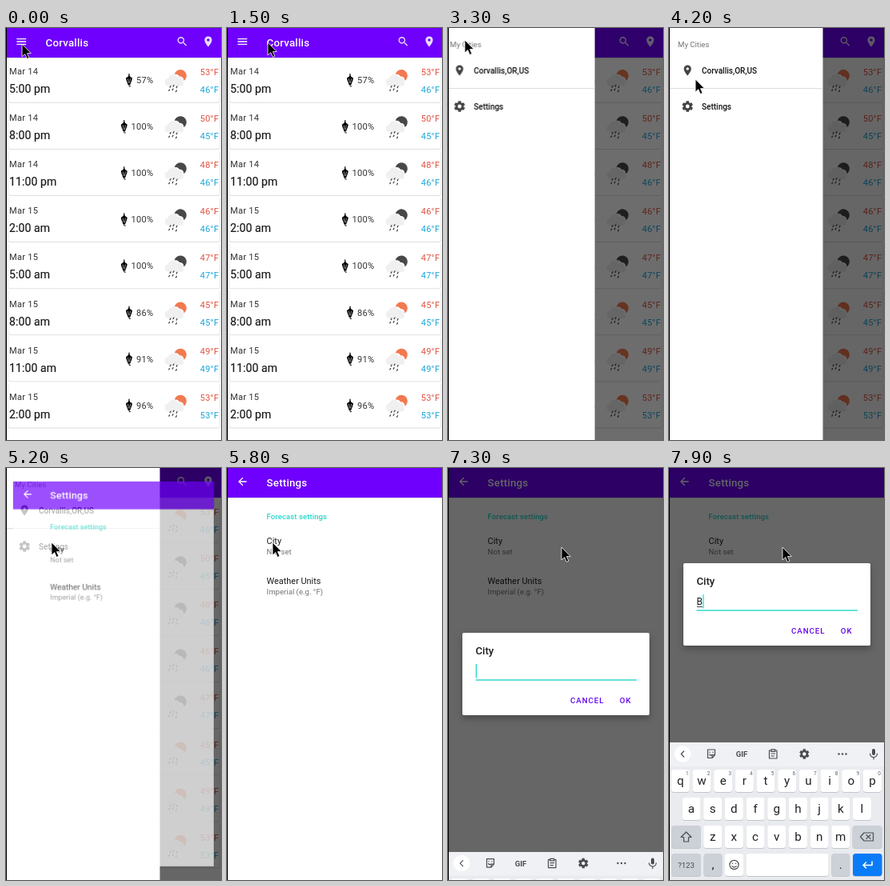
An HTML page for the animation above (8 s loop, 269 by 515 pixels).

```html
<!DOCTYPE html>
<html lang="en">
<head>
<meta charset="utf-8">
<title>Weather app</title>
<style>
html, body { margin: 0; width: 100%; height: 100%; overflow: hidden; background: #fff; }
svg { display: block; width: 100vw; height: 100vh; font-family: Roboto, Arial, sans-serif; }
.anim { animation: 8s linear infinite; }
.med { font-weight: 500; }
.title { font-size: 13.3px; font-weight: 500; letter-spacing: .2px; fill: #fff; }
.small { font-size: 11.1px; letter-spacing: .25px; fill: #333; }
.time { font-size: 14px; letter-spacing: .1px; fill: #1c1c1c; stroke: #1c1c1c; stroke-width: .2px; }
.hi { fill: #e2523f; }
.lo { fill: #1ba6dc; }
.end { text-anchor: end; }
.mid { text-anchor: middle; }
.item { font-size: 10px; font-weight: 500; fill: #111; }
.pref { font-size: 10.9px; fill: #1c1c1c; }
.sum { font-size: 9.6px; fill: #757575; }
.btn { font-size: 9.7px; font-weight: 500; letter-spacing: .95px; fill: #6200ee; }
.key { font-size: 15.2px; fill: #202124; }
.hint { font-size: 6.5px; fill: #5f6368; }

#pointer { animation-name: pointer; }
#drawer { animation-name: drawer; }
#scrim { animation-name: scrim; }
#settings { animation-name: settings; transform-origin: 135px 257px; }
#ripple { animation-name: ripple; }
#dim { animation-name: dim; }
#dialog { animation-name: dialog; }
#keyboard { animation-name: keyboard; }
#typed { animation-name: typed; }
#caret { animation-name: caret; }

@keyframes pointer {
  0% { transform: translate(20px, 20px); }
  6.25% { transform: translate(25px, 19px); }
  17.5% { transform: translate(46px, 18px); }
  18.75% { transform: translate(51px, 18px); }
  28.75% { transform: translate(47px, 18px); }
  33.75%, 42.5% { transform: translate(21px, 15px); }
  51.25%, 52.5% { transform: translate(33px, 64px); }
  62.5%, 75.6% { transform: translate(57px, 93px); }
  81.25%, 100% { transform: translate(142px, 99px); }
}
@keyframes drawer {
  0%, 38.1% { transform: translateX(-194px); animation-timing-function: ease-out; }
  41.9%, 100% { transform: none; }
}
@keyframes scrim {
  0%, 38.1% { opacity: 0; animation-timing-function: ease-out; }
  41.9%, 100% { opacity: .6; }
}
@keyframes settings {
  0%, 64% { opacity: 0; transform: scale(.9); animation-timing-function: ease-out; }
  66% { opacity: 1; }
  68.5%, 100% { opacity: 1; transform: none; }
}
@keyframes ripple {
  0%, 76% { opacity: 0; transform: scale(.1); }
  76.5% { opacity: .12; }
  81.25% { opacity: .12; transform: scale(1); }
  84% { opacity: .12; }
  87.5%, 100% { opacity: 0; transform: scale(1); }
}
@keyframes dim {
  0%, 82.5% { opacity: 0; }
  83.75% { opacity: .125; }
  85% { opacity: .36; }
  86.25% { opacity: .54; }
  87.5%, 100% { opacity: .6; }
}
@keyframes dialog {
  0%, 82.5% { opacity: 0; transform: none; }
  83.75% { opacity: .5; }
  85% { opacity: 1; }
  91.5% { opacity: 1; transform: none; animation-timing-function: ease-out; }
  94.5%, 100% { opacity: 1; transform: translateY(-87px); }
}
@keyframes keyboard {
  0%, 90.8% { transform: translateY(174px); animation-timing-function: ease-out; }
  94.2%, 100% { transform: none; }
}
@keyframes typed {
  0%, 97.49% { opacity: 0; }
  97.5%, 100% { opacity: 1; }
}
@keyframes caret {
  0%, 97.49% { transform: none; }
  97.5%, 100% { transform: translateX(7.6px); }
}
</style>
</head>
<body>
<svg id="stage" viewBox="0 0 269 515" preserveAspectRatio="none"></svg>
<script>
const PURPLE = '#6f00fd', TEAL = '#24d8cb';
const ICON = {
  menu: 'M3 18h18v-2H3v2zm0-5h18v-2H3v2zm0-7v2h18V6H3z',
  search: 'M15.5 14h-.79l-.28-.27C15.41 12.59 16 11.11 16 9.5 16 5.91 13.09 3 9.5 3S3 5.91 3 9.5 5.91 16 9.5 16c1.61 0 3.09-.59 4.23-1.57l.27.28v.79l5 4.99L20.49 19l-4.99-5zm-6 0C7.01 14 5 11.99 5 9.5S7.01 5 9.5 5 14 7.01 14 9.5 11.99 14 9.5 14z',
  pin: 'M12 2C8.13 2 5 5.13 5 9c0 5.25 7 13 7 13s7-7.75 7-13c0-3.87-3.13-7-7-7zm0 9.5c-1.38 0-2.5-1.12-2.5-2.5s1.12-2.5 2.5-2.5 2.5 1.12 2.5 2.5-1.12 2.5-2.5 2.5z',
  back: 'M20 11H7.83l5.59-5.59L12 4l-8 8 8 8 1.41-1.41L7.83 13H20v-2z'
};

const text = (x, y, s, cls) => `<text x="${x}" y="${y}" class="${cls}">${s}</text>`;
const rect = (x, y, w, h, fill, rx = 0) =>
  `<rect x="${x}" y="${y}" width="${w}" height="${h}" rx="${rx}" fill="${fill}"/>`;
const path = (d, fill, extra = '') => `<path d="${d}" fill="${fill}" ${extra}/>`;
const line = (d, color, w = 1.2) =>
  path(d, 'none', `stroke="${color}" stroke-width="${w}" stroke-linecap="round" stroke-linejoin="round"`);
const icon = (name, cx, cy, fill, k = .66) =>
  `<g transform="translate(${cx - 12 * k} ${cy - 12 * k}) scale(${k})">${path(ICON[name], fill)}</g>`;
const group = (id, body) => `<g id="${id}" class="anim">${body}</g>`;

function gear(cx, cy, r, fill) {
  let teeth = '';
  for (let a = 0; a < 180; a += 60)
    teeth += `<rect x="${-r * .27}" y="${-r}" width="${r * .54}" height="${2 * r}" rx=".5" transform="rotate(${a})" fill="${fill}"/>`;
  return `<g transform="translate(${cx} ${cy})">${teeth}
    <circle r="${r * .56}" fill="none" stroke="${fill}" stroke-width="${r * .42}"/>
    <circle r="${r * .35}" fill="#fff"/></g>`;
}

const umbrella = x => `<g transform="translate(${x} 0)">
  ${line('M0 57.5V60', '#000')}
  ${path('M0 59Q-1.2 61-4 62.6L-3.4 65.4L-1.3 71H1.3L3.4 65.4L4 62.6Q1.2 61 0 59Z', '#000')}
  ${line('M-1.5 63.6L-.7 68.5M1.5 63.6L.7 68.5', '#fff', .6)}
  ${line('M0 71V72.6Q.4 73.6 1.6 72.8', '#000', 1)}</g>`;

const weather = sun =>
  path('M210.8 58A7.6 7.6 0 1 1 222.4 66C222.6 62.4 220 60.6 217 60.6C215.8 58.2 213.4 57.2 210.8 58Z', sun) +
  path('M203 72.5A4.8 4.8 0 0 1 202.6 63A6.6 6.6 0 0 1 214.8 61.6A5.4 5.4 0 0 1 221.4 67A3.4 3.4 0 0 1 220 72.5Z', '#f0f0f0') +
  line('M206 72.5l-.8 1.6M210 71.5l-.8 1.6M214 73l-.8 1.6M204.6 77l-.8 1.4M209 76l-.8 1.6M213.4 78l-.8 1.6', '#444', 1.3);

// date, time, rain chance, high, low
const forecast = [
  ['Mar 14', '5:00 pm', 57, 53, 46], ['Mar 14', '8:00 pm', 100, 50, 45],
  ['Mar 14', '11:00 pm', 100, 48, 46], ['Mar 15', '2:00 am', 100, 46, 46],
  ['Mar 15', '5:00 am', 100, 47, 47], ['Mar 15', '8:00 am', 86, 45, 45],
  ['Mar 15', '11:00 am', 91, 49, 49], ['Mar 15', '2:00 pm', 96, 53, 53]
];
const row = ([day, time, rain, hi, lo], i) => `<g transform="translate(0 ${58.1 * i})">
  ${rect(3, 37, 264.5, 56.8, '#dedede', 2)}${rect(3.4, 36, 263.6, 56.8, '#fff', 2)}
  ${text(4, 58, day, 'small')}${text(4, 81, time, 'time')}
  ${umbrella(rain > 99 ? 147.8 : 154)}${text(184.3, 69, rain + '%', 'small end')}
  ${weather(i > 0 && i < 5 ? '#484848' : '#f27950')}
  ${text(266.4, 59, hi + '°F', 'small hi end')}${text(266.4, 81, lo + '°F', 'small lo end')}</g>`;

const bar = (title, left) =>
  rect(0, 37, 269, 1, '#e9e9e9') + rect(0, 0, 269, 37, PURPLE) +
  icon(left, 19.3, 17, '#fff') + text(49.6, 23, title, 'title');

const home = rect(0, 0, 269, 515, '#fff') + forecast.map(row).join('') +
  bar('Corvallis', 'menu') + icon('search', 220.5, 17, '#e9dcff') + icon('pin', 253, 17, '#e9dcff');

const drawer = rect(0, 0, 192.5, 515, '#fff') +
  text(11, 24, 'My Cities', 'sum') +
  icon('pin', 23.2, 53, '#444') + text(41, 57, 'Corvallis,OR,US', 'item') +
  rect(0, 75, 192.5, 1, '#dcdcdc') +
  gear(23.2, 98, 6.8, '#444') + text(41, 102, 'Settings', 'item');

const settings = rect(0, 0, 269, 515, '#fff') +
  `<text x="49.6" y="64" class="med" font-size="9.5" letter-spacing=".1" fill="${TEAL}">Forecast settings</text>
  <g clip-path="url(#cityRow)"><g transform="translate(57 97)"><circle id="ripple" class="anim" r="225"/></g></g>` +
  text(49.6, 95, 'City', 'pref') + text(49.6, 108, 'Not set', 'sum') +
  text(49.6, 145, 'Weather Units', 'pref') + text(49.6, 158, 'Imperial (e.g. °F)', 'sum') +
  bar('Settings', 'back');

const dialog = `<rect x="18" y="206" width="234" height="103" rx="2" fill="#fff" filter="url(#shadow)"/>` +
  `<text x="34.5" y="233" class="med" font-size="13.2" fill="#1c1c1c">City</text>` +
  rect(34.5, 264.3, 201.5, 1.4, TEAL) +
  group('typed', '<text x="34.4" y="258.3" font-size="12" fill="#1c1c1c">B</text>' + rect(35, 260, 7, .9, '#333')) +
  group('caret', rect(34.7, 245, 1.3, 17.5, TEAL)) +
  text(153, 293.5, 'CANCEL', 'btn') + text(214.8, 293.5, 'OK', 'btn');

const GREY = '#ccd0d7', INK = '#4a4d52';
const key = (x, y, w, fill = '#fff') =>
  rect(x, y + 1, w, 28, '#c3c6cb', 3.5) + rect(x, y, w, 28, fill, 3.5);
const letters = (s, x0, y, hints = '') => [...s].map((c, i) => {
  const cx = x0 + 26.68 * i;
  return key(cx - 11.5, y, 23) + text(cx, y + 19, c, 'key mid') +
    (hints ? text(cx + 10.4, y + 7, hints[i], 'hint end') : '');
}).join('');

const tools =
  '<circle cx="17" cy="357.5" r="10.3" fill="#fff"/>' + line('M18.6 354l-3.4 3.5l3.4 3.5', INK) +
  line('M48.5 352H57.5V358.5L54 362.5H48.5ZM54 362.5V358.5H57.5M50.6 358Q52 360 53.5 358.5M51 355v.4M55 355v.4', INK) +
  `<text x="91" y="361" class="mid" font-size="9.6" font-weight="700" fill="${INK}">GIF</text>` +
  line('M127.5 353H125.5V363H135V353H133M127.8 351.8H132.7V354.4H127.8ZM128 357H132.5M128 360H131.5', INK) +
  gear(169.3, 357.5, 6.2, INK) +
  [212.5, 217, 221.5].map(x => `<circle cx="${x}" cy="357.5" r="1.2" fill="${INK}"/>`).join('') +
  rect(254, 351, 4, 8, INK, 2) + line('M251.6 357.2A4.4 4.4 0 0 0 260.4 357.2M256 361.6V364', INK);

const keyboard = rect(0, 343, 269, 172, '#e9ebef') + rect(0, 343, 269, 30, '#eff1f4') + tools +
  letters('qwertyuiop', 14.3, 377, '1234567890') +
  letters('asdfghjkl', 28, 412) +
  key(3, 447, 37, GREY) + letters('zxcvbnm', 54.7, 447) + key(229.5, 447, 37, GREY) +
  line('M21.5 455L28 461.5H24.5V467H18.5V461.5H15Z', INK) +
  line('M239.5 461L244 456H255.5V466H244ZM247 458.7L252 463.3M252 458.7L247 463.3', INK) +
  key(3, 482, 37, GREY) + `<text x="21.5" y="499.5" class="mid" font-size="9.6" fill="${INK}">?123</text>` +
  key(43.5, 482, 23, GREY) + text(55, 501, ',', 'key mid') +
  key(70, 482, 23) + `<circle cx="81.5" cy="496" r="5.6" fill="none" stroke="${INK}" stroke-width="1.2"/>` +
  line('M79.5 494.2v.3M83.5 494.2v.3M78.8 497.6Q81.5 500.6 84.2 497.6', INK) +
  key(96.5, 482, 103) +
  key(203.3, 482, 23, GREY) + text(214.8, 501, '.', 'key mid') +
  key(230, 482, 36.5, '#0a7bf6') +
  line('M254 492V496.5H243M246.5 493L243 496.5L246.5 500', '#fff', 1.6);

document.getElementById('stage').innerHTML = `<defs>
  <clipPath id="cityRow"><rect x="0" y="72" width="269" height="50"/></clipPath>
  <filter id="shadow" x="-10%" y="-15%" width="120%" height="140%">
    <feDropShadow dx="0" dy="4" stdDeviation="4" flood-opacity=".28"/></filter></defs>` +
  home +
  group('scrim', rect(0, 0, 269, 515, '#000')) +
  group('drawer', drawer) +
  group('settings', settings) +
  group('dim', rect(0, 0, 269, 515, '#000')) +
  group('dialog', dialog) +
  group('keyboard', keyboard) +
  rect(0, 0, 1, 515, '#000') +
  group('pointer', path('M0 0V16L3.7 12.6L6.2 18.4L8.9 17.2L6.4 11.6H11.3Z', '#000',
    'stroke="#fff" stroke-width=".8" stroke-linejoin="round"'));
</script>
</body>
</html>
```
